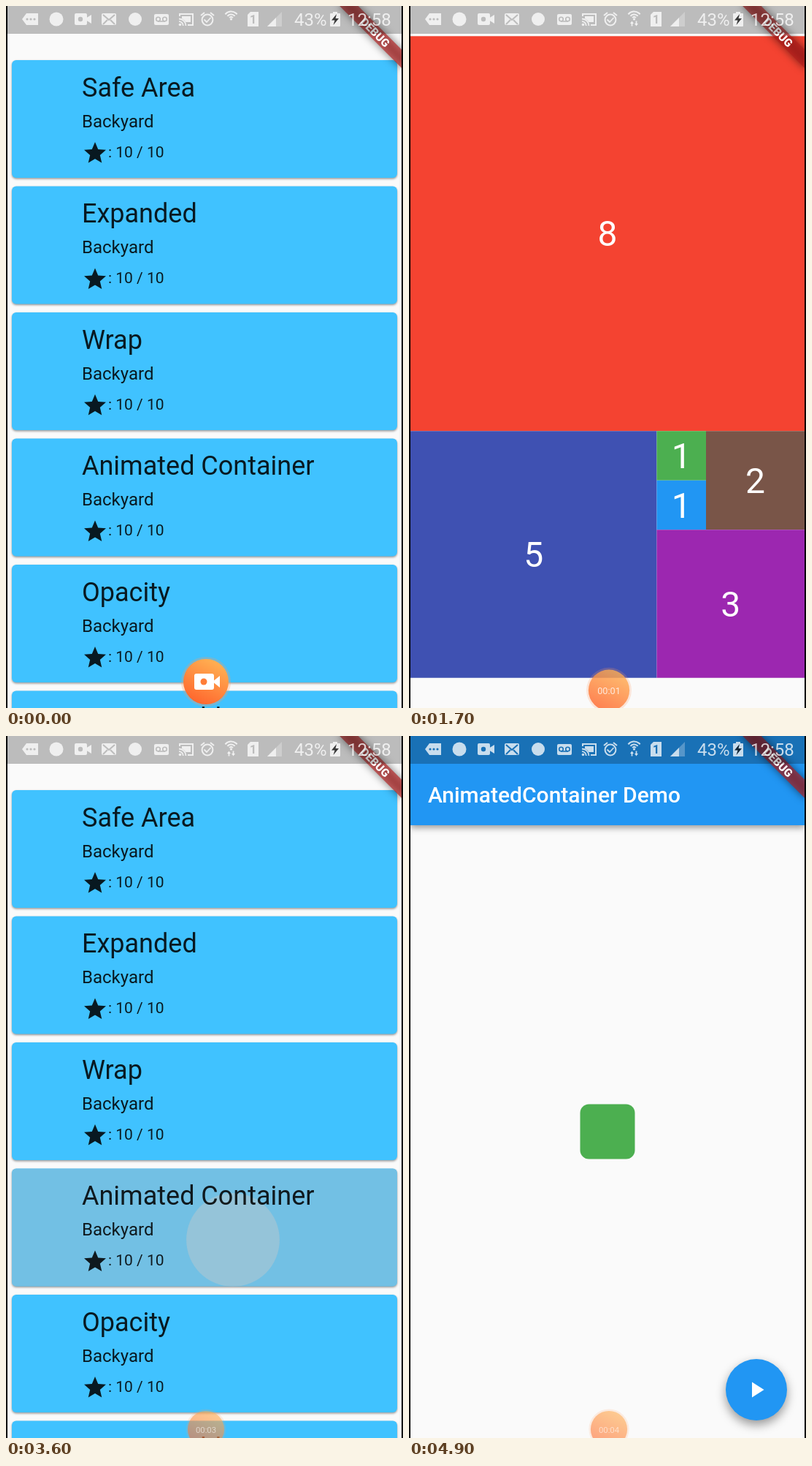
Recreate the animation shown at these times as an HTML page with a canvas. Size 544x960 px, loop 5000 ms.

```html
<!DOCTYPE html>
<html lang="en">
<head>
<meta charset="utf-8">
<title>Widget list</title>
<style>
  html, body { margin: 0; width: 100%; height: 100%; overflow: hidden; background: #000; }
  canvas { display: block; width: 544px; height: 960px; }
</style>
</head>
<body>
<canvas id="stage" width="544" height="960"></canvas>
<script>
const W = 544, H = 960, LOOP = 5000, TAU = Math.PI * 2;
const LEFT = 2, WIDTH = 540, PITCH = 172.5;
const c = document.getElementById('stage').getContext('2d');
const titles = ['Safe Area', 'Expanded', 'Wrap', 'Animated Container', 'Opacity', 'Future Builder'];
const star = new Path2D('M12 17.27L18.18 21l-1.64-7.03L22 9.24l-7.19-.61L12 2 9.19 8.63 2 9.24l5.46 4.73L5.82 21z');
const play = new Path2D('M8 5v14l11-7z');
const INK = 'rgba(0,0,0,.87)', PAPER = '#fafafa', BLUE = '#2196f3', GREEN = '#4caf50';

const presses = [
  { card: 1, x: 332, y: 362, reach: 344, down: 250, up: 850 },
  { card: 3, x: 311, y: 689, reach: 318, down: 3400, up: 3900 }
];

const clamp = v => Math.max(0, Math.min(1, v));
const ramp = (t, from, to) => clamp((t - from) / (to - from));

function rect(g, x, y, w, h, r, fill) {
  g.fillStyle = fill;
  g.beginPath();
  g.roundRect(x, y, w, h, r);
  g.fill();
}

function disc(g, x, y, r, fill) {
  g.fillStyle = fill;
  g.beginPath();
  g.arc(x, y, r, 0, TAU);
  g.fill();
}

function poly(g, points, fill) {
  g.fillStyle = fill;
  g.beginPath();
  for (let i = 0; i < points.length; i += 2) g.lineTo(points[i], points[i + 1]);
  g.closePath();
  g.fill();
}

function line(g, points, width) {
  g.lineWidth = width;
  g.beginPath();
  for (let i = 0; i < points.length; i += 2) g.lineTo(points[i], points[i + 1]);
  g.stroke();
}

function arc(g, x, y, r, from, to, width) {
  g.lineWidth = width;
  g.beginPath();
  g.arc(x, y, r, from, to);
  g.stroke();
}

function text(g, s, x, y, size, fill, weight = 400, align = 'left') {
  g.font = `${weight} ${size}px Roboto, sans-serif`;
  g.textAlign = align;
  g.fillStyle = fill;
  g.fillText(s, x, y);
}

function withShadow(blur, dy, alpha, draw) {
  c.save();
  c.shadowColor = `rgba(0,0,0,${alpha})`;
  c.shadowBlur = blur;
  c.shadowOffsetY = dy;
  draw();
  c.restore();
}

function icon(path, x, y, fill) {
  c.save();
  c.translate(x, y);
  c.scale(1.5, 1.5);
  c.fillStyle = fill;
  c.fill(path);
  c.restore();
}

// Status bar glyphs live on their own layer so holes can be punched out.
function makeIcons() {
  const layer = document.createElement('canvas');
  layer.width = W;
  layer.height = 38;
  const g = layer.getContext('2d'), on = '#fff';
  const cut = draw => {
    g.globalCompositeOperation = 'destination-out';
    draw();
    g.globalCompositeOperation = 'source-over';
  };
  g.strokeStyle = on;

  poly(g, [22, 18, 28, 10, 44, 10, 44, 26, 28, 26], on);
  cut(() => [29, 34, 39].forEach(x => disc(g, x, 18, 1.6, on)));

  disc(g, 69, 18, 9.5, on);

  rect(g, 94, 10, 17, 16, 2, on);
  poly(g, [109, 17, 117, 12, 117, 24, 109, 19], on);
  cut(() => disc(g, 102, 18, 3.2, on));

  rect(g, 131, 10, 20, 16, 2, on);
  cut(() => {
    line(g, [133, 12, 141, 19, 149, 12], 2);
    line(g, [133, 25, 139, 19], 2);
    line(g, [149, 25, 143, 19], 2);
  });

  disc(g, 177, 18, 9, on);

  rect(g, 203, 11, 20, 15, 2, on);
  cut(() => {
    arc(g, 208.5, 18, 2.8, 0, TAU, 1.6);
    arc(g, 217.5, 18, 2.8, 0, TAU, 1.6);
    line(g, [208, 21, 218, 21], 1.6);
  });

  line(g, [238, 14, 238, 11, 256, 11, 256, 26, 249, 26], 2);
  rect(g, 241, 14, 12, 8, 0, on);
  cut(() => disc(g, 237, 27, 10.5, on));
  arc(g, 237, 27, 9.5, -Math.PI / 2, 0, 1.8);
  arc(g, 237, 27, 5.8, -Math.PI / 2, 0, 1.8);
  disc(g, 238.5, 25.5, 1.8, on);

  arc(g, 276, 19, 7.4, 0, TAU, 2);
  line(g, [267, 13, 272, 9], 2);
  line(g, [285, 13, 280, 9], 2);
  line(g, [271.5, 18.5, 275, 22, 280.5, 16], 1.8);

  [3, 6.5, 10.5].forEach(r => arc(g, 308.5, 18, r, -2.45, -0.69, 2.1));
  disc(g, 308.5, 18, 1.6, on);

  poly(g, [335, 8, 346, 8, 346, 28, 331, 28, 331, 12], on);
  cut(() => text(g, '1', 338.5, 24, 16, on, 700, 'center'));

  g.globalAlpha = .35;
  poly(g, [358, 28, 378, 8, 378, 28], on);
  g.globalAlpha = 1;
  poly(g, [358, 28, 370, 16, 370, 28], on);

  text(g, '43%', 395, 27, 24, on);
  rect(g, 444, 10, 14, 18, 1, on);
  rect(g, 448, 8, 6, 3, 0, on);
  poly(g, [453, 11, 446, 19.5, 450.5, 19.5, 448.5, 26, 456, 17, 451.5, 17], '#111');
  text(g, '12:58', 468, 27, 24, on);
  return layer;
}
const icons = makeIcons();

function statusBar(t) {
  c.fillStyle = 'rgba(0,0,0,.25)';
  c.fillRect(LEFT, 0, WIDTH, 38);
  c.save();
  c.globalAlpha = .76;
  c.drawImage(icons, 0, 0);
  if (t >= 100) {
    poly(c, [303, 24, 305.5, 20.5, 308, 24], '#fff');
    rect(c, 304.6, 23, 1.8, 4.5, 0, '#fff');
    poly(c, [309, 24, 311.5, 27.5, 314, 24], '#fff');
    rect(c, 310.6, 20.5, 1.8, 4, 0, '#fff');
  }
  c.restore();
}

function debugBanner() {
  c.save();
  c.translate(LEFT + WIDTH, 0);
  c.rotate(Math.PI / 4);
  c.filter = 'blur(6px)';
  rect(c, -60, 42, 120, 18, 0, 'rgba(0,0,0,.5)');
  c.filter = 'none';
  rect(c, -60, 42, 120, 18, 0, 'rgba(183,28,28,.63)');
  text(c, 'DEBUG', 0, 56.5, 15.3, '#fff', 900, 'center');
  c.restore();
}

function ripple(p, y, t) {
  if (t < p.down || t > p.up + 200) return;
  const fade = 1 - ramp(t, p.up, p.up + 200);
  const held = (Math.min(t, p.up) - p.down) / 1000;
  const size = Math.min(1, held + Math.max(0, t - p.up) * 1.5 / p.reach);
  c.save();
  c.beginPath();
  c.roundRect(8, y, 528, 161, 6);
  c.clip();
  c.fillStyle = `rgba(188,188,188,${.4 * fade * ramp(t, p.down, p.down + 200)})`;
  c.fillRect(8, y, 528, 161);
  disc(c, p.x, p.y, p.reach * size, `rgba(200,200,200,${.4 * fade})`);
  c.restore();
}

function listPage(t) {
  titles.forEach((title, i) => {
    const y = 74 + i * PITCH, base = Math.floor(y);
    withShadow(3, 1.5, .4, () => rect(c, 8, y, 528, 161, 6, '#40c2ff'));
    presses.filter(p => p.card === i).forEach(p => ripple(p, y, t));
    text(c, title, 104, base + 50, 36, INK);
    text(c, 'Backyard', 104, base + 92, 24, INK);
    icon(star, 104, y + 109, INK);
    text(c, ': 10 / 10', 140, base + 133, 21, INK);
  });
}

function tile(n, x, y, w, h, fill) {
  c.fillStyle = fill;
  c.fillRect(x, y, w, h);
  text(c, n, x + w / 2, Math.round(y + h / 2 + 17), 48, '#fff', 400, 'center');
}

function tilesPage() {
  tile(8, 2, 41.25, 540, 540, '#f44331');
  tile(5, 2, 581.25, 337.5, 337.5, '#3f51b2');
  tile(1, 339.5, 581.25, 67.5, 67.5, GREEN);
  tile(1, 339.5, 648.75, 67.5, 67.5, BLUE);
  tile(2, 407, 581.25, 135, 135, '#795548');
  tile(3, 339.5, 716.25, 202.5, 202.5, '#9c27b0');
}

function demoPage() {
  withShadow(9, 3, .42, () => rect(c, LEFT, 0, WIDTH, 122, 0, BLUE));
  text(c, 'AnimatedContainer Demo', 26, 91, 30, '#fff', 500);
  rect(c, 234.5, 503.5, 75, 75, 12, GREEN);
  withShadow(14, 6, .4, () => disc(c, 476, 894, 42, BLUE));
  icon(play, 458, 876, '#fff');
}

function slidePage(shift, draw) {
  if (shift >= 1) return;
  c.save();
  c.translate(WIDTH * shift, 0);
  c.beginPath();
  c.rect(LEFT, 0, WIDTH, H);
  c.clip();
  c.fillStyle = PAPER;
  c.fillRect(LEFT, 0, WIDTH, H);
  draw();
  c.restore();
}

function recorder(t) {
  const dock = ramp(t, 1550, 1860);
  c.save();
  c.translate(274, 924 + 24 * dock);
  c.scale(1 - .19 * dock, 1 - .19 * dock);
  c.globalAlpha = 1 - .44 * dock;
  disc(c, 0, 0, 34, 'rgba(255,150,90,.28)');
  const glow = c.createLinearGradient(-14, 28, 14, -28);
  glow.addColorStop(0, '#ff672e');
  glow.addColorStop(1, '#ffb052');
  disc(c, 0, 0, 31, glow);
  if (t < 50) {
    rect(c, -16, -11, 27, 22, 3, '#fff');
    poly(c, [9, 0, 19, -8, 19, 8], '#fff');
    disc(c, -3, 0, 4.5, '#ff7d38');
  } else {
    text(c, '00:0' + Math.floor((t - 50) / 1000), 0, 6, 14, '#fff', 400, 'center');
  }
  c.restore();
}

function render(t) {
  c.fillStyle = '#000';
  c.fillRect(0, 0, W, H);
  c.save();
  c.beginPath();
  c.rect(LEFT, 0, WIDTH, H);
  c.clip();
  slidePage(0, () => listPage(t));
  slidePage(1 - ramp(t, 900, 1200) + ramp(t, 2100, 2400), tilesPage);
  slidePage(1 - ramp(t, 3950, 4250), demoPage);
  debugBanner();
  statusBar(t);
  recorder(t);
  c.restore();
}

const start = performance.now();
function tick() {
  render((performance.now() - start) % LOOP);
  requestAnimationFrame(tick);
}
tick();
</script>
</body>
</html>
```
